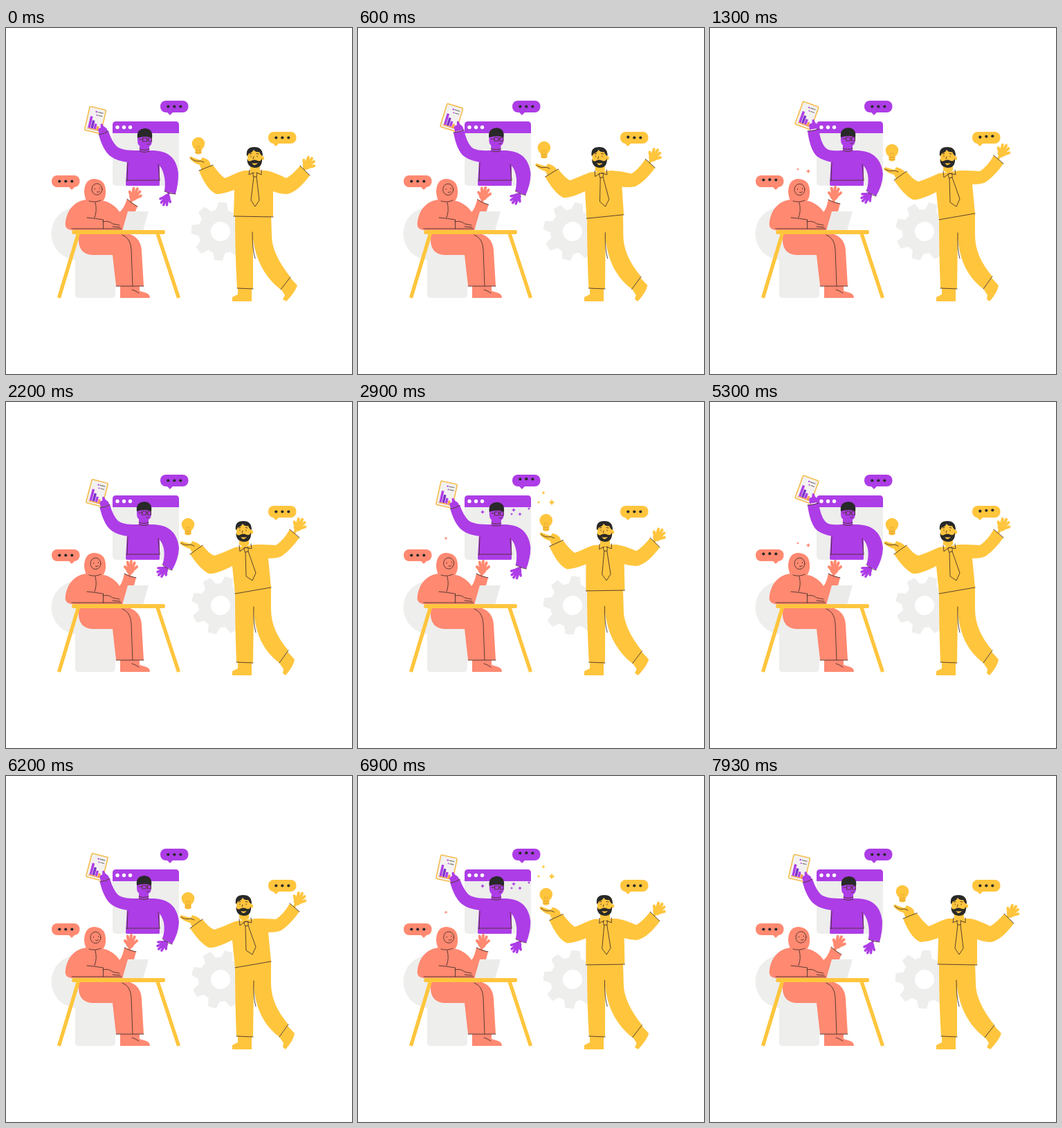
These frames come from a looping animation (500x500 px, 8.01 s). An HTML page:

```html
<!DOCTYPE html>
<html lang="en">
<head>
<meta charset="utf-8">
<title>Team meeting</title>
<style>
  html, body { margin: 0; width: 100%; height: 100%; overflow: hidden; background: #fff; }
  svg { display: block; width: 100vw; height: 100vh; }
  .coral { fill: #ff8971; }
  .gold { fill: #ffc53d; }
  .violet { fill: #ad3de6; }
  .pale { fill: #eeeeed; }
  .ink { fill: #292929; }
  .line { fill: none; stroke: #4a332b; stroke-width: .9; stroke-linecap: round; stroke-linejoin: round; }
</style>
</head>
<body>
<svg viewBox="0 0 500 500">
  <defs>
    <g id="palm" stroke-linecap="round">
      <ellipse rx="5.5" ry="6.5"/>
      <path d="M-2 0L-5 -10M0 0L0 -12M2 0L5 -10M3 2L9 -5M-2 3L-8 -3M0 2L0 9" stroke-width="4"/>
    </g>
    <path id="spark" d="M0 -1Q.15 -.15 1 0Q.15 .15 0 1Q-.15 .15 -1 0Q-.15 -.15 0 -1Z"/>
  </defs>

  <!-- backdrop -->
  <g id="gear" class="pale"></g>
  <circle class="pale" cx="104" cy="297" r="38.5"/>
  <path class="pale" d="M100 290H158V385Q158 390 153 390H105Q100 390 100 385Z"/>
  <rect class="pale" x="154" y="135" width="96" height="93" rx="5"/>
  <path class="violet" d="M154 152V140Q154 135 159 135H245Q250 135 250 140V152Z"/>
  <g fill="#fff"><circle cx="161" cy="143.5" r="2.7"/><circle cx="170.500" cy="143.5" r="2.7"/><circle cx="179.500" cy="143.5" r="2.7"/></g>

  <!-- presenter in the window -->
  <g data-pos="129 133 13" data-to="140 126.5 20" data-k="page">
    <rect x="-12" y="-17.5" width="24" height="35" rx="1.5" fill="#f3f1f0" stroke="#f5bd4d" stroke-width="1.6"/>
    <path class="violet" d="M-8 -4H-4.5V13H-8ZM.4 5H3.8V13H.4Z"/>
    <path fill="#7d32c9" d="M-3.8 1H-.3V13H-3.8Z"/>
    <path fill="#f7a24b" d="M4.4 8H7.6V13H4.4ZM-9 13H8.5V14.5H-9Z"/>
    <path d="M1 -12H9M3 -7.5H9" stroke="#777" stroke-width="1.2"/>
    <circle class="violet" cx="-1" cy="-12" r="1.2"/><circle class="violet" cx="1" cy="-7.5" r="1"/>
  </g>
  <g class="violet" data-pos="139.5 146.5 -14" data-to="149.5 140.5 -5" data-k="page">
    <path d="M-6 6L-6.5 0Q-6 -3 -2 -3L-1 -8Q2 -10 2.5 -4L6 0L7 5Z"/>
  </g>
  <g class="violet" stroke="#ad3de6" data-pos="232 246 204" data-to="228.5 243 228" data-k="drop"><use href="#palm" transform="scale(.88)"/></g>
  <path class="violet" data-k="page"
    data-a="M192 177C176 177 166 176 160 171Q153 164 148 149L134 154C137 166 143 180 152 186Q160 192 176 194Z"
    data-b="M192 177C177 178 170 177 166 172Q160 165 157 146L141 149C143 163 147 181 157 187Q163 191 176 194Z"/>
  <path class="violet" data-k="drop"
    data-a="M209 177C236 176 247 190 249 210Q249 226 245 240L229 236Q231 222 228 212Q226 202 219 196Z"
    data-b="M209 177C236 176 248 190 250 211Q249 228 240 243L226 235Q230 224 228 212Q226 202 219 196Z"/>
  <path class="violet" d="M188 177H215L222 196V227Q222 228 220 228H175Q173 228 173 226L175 190Z"/>
  <path class="line" d="M174 220H222M175 221L176 195M222 220L220 197"/>
  <path class="line" data-k="page" data-a="M134 154Q142 153 148 149" data-b="M141 149Q150 149 157 146"/>
  <path class="line" data-k="drop" data-a="M229 236Q237 240 245 240" data-b="M226 235Q232 241 240 243"/>
  <g data-pos="0 1 0" data-to="-1 0 0" data-k="lean">
    <path class="violet" d="M193 168H207V179H193Z"/>
    <path class="line" d="M193 174Q200 177 207 174M193 177Q200 180 207 177"/>
    <path class="violet" d="M190 153H211V163Q210 171 203 171H197Q190 170 190 162Z"/>
    <path class="ink" d="M190 158Q188 145 201 144Q213 145 211 158Q202 154 190 158Z"/>
    <path class="line" d="M193 160L198 160M198 158H203.5V163H198ZM206 158H210.500V163H206ZM203.5 160H206M204 167Q207 168 208 166"/>
  </g>

  <!-- woman at the desk -->
  <g class="coral" stroke="#ff8971" data-pos="184.5 243 27" data-to="179.5 242 7" data-k="wave"><use href="#palm"/></g>
  <path class="coral" data-k="wave"
    data-a="M140 252Q155 252 164 266Q170 262 175 247L190 258Q183 276 172 285L150 291Z"
    data-b="M140 252Q155 252 164 266Q168 262 171 248L188 254Q184 274 172 285L150 291Z"/>
  <path class="line" data-k="wave" data-a="M175 247Q182 254 190 258" data-b="M171 248Q179 253 188 254"/>
  <path class="coral" d="M116 248C100 250 89 261 86 280Q84 291 95 292H172V280Q160 254 142 250Z"/>
  <path class="coral" d="M113 236Q114 218 128 218Q143 219 144 234Q145 247 138 252L139 274H117L118 252Q113 245 113 236Z"/>
  <g class="line" data-pos="131.5 233 0" data-to="129.5 233.5 0" data-k="lean">
    <ellipse rx="7.5" ry="8.2"/>
    <path d="M-3 -1V0M4 -2V-1M0 4Q3 5 4 3"/>
  </g>
  <path class="line" d="M120 250Q129 253 137 249M129 252Q132 264 128 274M117 274Q128 275 140 277M95 290H167M140.500 290V277M140 280Q149 278 154 283L164 285M154 287L165 288"/>
  <path class="coral" d="M105 297H176Q195 302 196 322L199 373H159L154 328H124Q105 326 105 306Z"/>
  <path class="coral" d="M165 372H193V380L203 383Q208 385 208 390H165Z"/>
  <path class="line" d="M168 299Q180 303 181 320L183 373M159 373H199M182 378Q188 380 192 383"/>
  <path d="M176 265H206L198 293H168Z" fill="#ebebea"/>
  <g stroke="#ffc53d" stroke-linecap="round">
    <path d="M104.500 297L76.500 390M219 297L249.500 390" stroke-width="5.300" stroke-linecap="butt"/>
    <path d="M98 295H227" stroke-width="6"/>
  </g>

  <!-- man with the idea -->
  <g class="gold">
    <path data-k="lean"
      data-a="M331 268L383 268L384 300Q384 326 411 360L397 378C374 360 361 335 357 305L357 377L334 376Q331 330 331 268Z"
      data-b="M331 272L383 265L383 300Q383 330 408 359L395 377C372 360 361 335 358 305L357 377L333 376Q331 330 331 272Z"/>
    <path d="M335 375H355V395H327V389L335 385Z"/>
    <path data-k="lean"
      data-a="M397 377L410 360L421 372Q417 383 405 395L400 392L403 386Z"
      data-b="M395 377L407 361L417 372Q415 383 404 395L400 392L401 386Z"/>
    <path data-k="lean"
      data-a="M283 206L280 198Q270 195 265 188Q266 184 270 187L281 191L284 187Q291 189 294 193L297 202Z"
      data-b="M270 220L266 212Q257 210 251 204Q252 200 256 202L267 205L269 201Q277 203 281 207L284 211Z"/>
    <g stroke="#ffc53d" data-pos="435 198 36" data-to="422 180 31" data-k="lean"><use href="#palm"/></g>
    <path data-k="lean"
      data-a="M344 206C332 209 325 214 316 217Q308 211 299 198L279 206C285 222 294 236 304 240Q313 240 330 234L329 272L386 273L386 236Q396 240 406 240C417 238 428 228 439 213L425 199Q413 213 405 217C395 212 386 208 376 206Z"
      data-b="M331 210C321 214 311 219 301 222Q293 219 284 207L266 220C275 233 283 243 293 248Q304 249 327 237L331 277L383 268L379 226Q392 226 398 223C408 216 416 207 424 196L410 184Q402 199 390 207C381 206 371 206 361 206Z"/>
  </g>
  <g class="line">
    <path data-k="lean"
      data-a="M279 206L299 198M425 199L439 213M329 272L386 273"
      data-b="M266 220L284 207M410 184L424 196M331 277L383 268"/>
    <path data-k="lean"
      data-a="M267 188Q273 194 281 192L286 194M356 295Q356 320 360 333M334 376L357 377M397 378L411 360"
      data-b="M253 204Q259 208 267 206L272 208M358 296Q357 320 361 333M333 376L357 377M395 377L408 359"/>
    <path data-k="lean"
      data-a="M352 205L351 212L360 208L369 212L369 205M357 209L363 209L362 215L358 215ZM358 215L354 249L360 258L366 249L362 215"
      data-b="M337 207L338 216L346 210L355 212L354 205M344 211L350 210L350 216L346 217ZM346 217L347 252L356 258L361 247L350 216"/>
  </g>
  <g data-pos="0 0 0" data-to="-16 0 0" data-k="lean">
    <path class="gold" d="M353 194H367V206L360 210L353 206ZM349 177H370V192Q369 200 360 200Q350 200 349 192Z"/>
    <circle class="gold" cx="370.5" cy="188" r="2.7"/>
    <path class="ink" d="M348 185Q346 172 359 172Q371 172 371 185Q368 184 366 179Q361 180 358 176Q355 181 351 181Q350 184 348 185Z"/>
    <path class="ink" d="M348.500 189Q350 194 354 192Q359 189 364 192Q369 193 370 188Q371 202 359.500 202Q348 201 348.500 189Z"/>
    <path d="M355 195Q359 196 364 195Q361 199 358 198Z" fill="#ffc53d"/>
    <path class="line" d="M354 185V186M363 185V186M358 186L357 189M352 182L355 181.500M362 181.500L365 182"/>
  </g>
  <g data-pos="278 167 0" data-to="263 177 0" data-k="bulb">
    <path class="gold" d="M-9.300 0A9.300 9.300 0 1 1 9.300 0Q9 5 4.500 9V14Q0 17 -4.500 14V9Q-9 5 -9.300 0Z"/>
    <path d="M-4.500 10H4.500M-4.500 13H4.500" stroke="#d79a24" stroke-width=".9"/>
    <path class="line" d="M-2 9L-2 3L0 5L2 3L2 9" style="stroke:#e2a62c;stroke-width:.7"/>
  </g>

  <g id="bubbles"></g>
  <g id="sparks"></g>
</svg>
<script>
const LOOP = 8010, STEPS = 80;
const NS = 'http://www.w3.org/2000/svg';
const $ = id => document.getElementById(id);
const add = (parent, tag, attrs) => {
  const el = document.createElementNS(NS, tag);
  for (const name in attrs) el.setAttribute(name, attrs[name]);
  return parent.appendChild(el);
};

// [seconds, value] keys, eased in and out between neighbours
const tracks = {
  lean: [[0, 0], [1, 1], [2.3, 1], [3.2, -.1], [4, 0]],
  bulb: [[0, 0], [1.05, 1], [2.4, 1], [3.35, -.08], [4, 0]],
  page: [[0, 0], [1.1, 1], [1.5, 1], [2.6, -.1], [4, 0]],
  drop: [[0, 0], [1.1, 1], [2.2, 1], [3.4, 0], [4, 0]],
  wave: [[0, 0], [1, 1], [2.95, 1], [3.8, 0], [4, 0]]
};
function sample(keys, s) {
  const i = Math.max(1, keys.findIndex(k => k[0] >= s));
  const [t0, v0] = keys[i - 1], [t1, v1] = keys[i];
  const u = (s - t0) / (t1 - t0);
  return v0 + (v1 - v0) * u * u * (3 - 2 * u);
}

const numbers = text => text.match(/-?[\d.]+/g).map(Number);
const blend = (a, b, p) => a.map((v, i) => v + (b[i] - v) * p);

const morphs = [...document.querySelectorAll('[data-a]')].map(el => ({
  el, key: el.dataset.k, shape: el.dataset.a,
  a: numbers(el.dataset.a), b: numbers(el.dataset.b)
}));
const movers = [...document.querySelectorAll('[data-pos]')].map(el => ({
  el, key: el.dataset.k, a: numbers(el.dataset.pos), b: numbers(el.dataset.to)
}));

// gear: ring plus eight teeth
add($('gear'), 'circle', { r: 23, fill: 'none', stroke: '#eeeeed', 'stroke-width': 18 });
for (let i = 0; i < 8; i++)
  add($('gear'), 'path', { d: 'M-9 -29L-6 -42H6L9 -29Z', transform: `rotate(${i * 45})` });

// x, y, tail x, colour class, start of the dot wave
const dots = [];
[[66, 213, 29, 'coral', .7], [223, 105, 14, 'violet', 2.3], [379, 150, 11, 'gold', .5]].forEach(([x, y, tail, color, start]) => {
  const g = add($('bubbles'), 'g', { transform: `translate(${x} ${y})` });
  add(g, 'rect', { width: 40.5, height: 17, rx: 8, class: color });
  add(g, 'path', { d: `M${tail - 5} 16L${tail} 21L${tail + 5} 16Z`, class: color });
  for (let i = 0; i < 3; i++)
    dots.push({ el: add(g, 'circle', { cx: 11.3 + i * 9, r: 2.1, class: 'ink' }), start: start + i * .15 });
});

// x, y, radius, colour class, first and last second
const sparks = [
  [127, 204, 2, 'coral', .9, 1.8], [142, 207, 3.2, 'coral', .8, 1.9], [127, 197, 2.4, 'coral', 2.2, 3.4],
  [280, 145, 5, 'gold', 2.3, 3.5], [268, 131, 2.8, 'gold', 2.4, 3.4], [261, 145, 2.3, 'gold', 2.3, 3.4],
  [180, 159, 3, 'violet', 2.3, 3.5], [225, 156, 3, 'violet', 2.4, 3.5],
  [234, 162, 2.8, 'violet', 2.3, 3.4], [222, 162, 2, 'violet', 2.4, 3.3], [247, 154, 2.3, 'violet', 2.3, 3.4]
].map(([x, y, r, color, from, to]) => ({
  x, y, r, from, to, el: add($('sparks'), 'use', { href: '#spark', class: color })
}));
const pulse = (s, from, length) => {
  const u = (s - from) / length;
  return u > 0 && u < 1 ? Math.sin(Math.PI * u) : 0;
};

function draw(s) {
  const p = {};
  for (const key in tracks) p[key] = sample(tracks[key], s);
  for (const { el, key, shape, a, b } of morphs) {
    const mixed = blend(a, b, p[key]);
    let i = 0;
    el.setAttribute('d', shape.replace(/-?[\d.]+/g, () => mixed[i++].toFixed(2)));
  }
  for (const { el, key, a, b } of movers) {
    const [x, y, turn] = blend(a, b, p[key]);
    el.setAttribute('transform', `translate(${x} ${y}) rotate(${turn})`);
  }
  $('gear').setAttribute('transform', `translate(310 294) rotate(${4 + 13 * p.lean})`);
  for (const { el, start } of dots) el.setAttribute('cy', 8.5 - 2.3 * pulse(s, start, .9));
  for (const { el, x, y, r, from, to } of sparks) {
    const size = r * Math.min(1, 1.3 * pulse(s, from, to - from));
    el.setAttribute('transform', `translate(${x} ${y}) scale(${size})`);
  }
}

// the picture steps twice every 100 ms, at 0 and 30
function tick() {
  const t = performance.now() % LOOP;
  const step = t >= 7930 ? 159 : 2 * Math.floor(t / 100) + (t % 100 >= 30 ? 1 : 0);
  draw((step % STEPS) * .05);
  requestAnimationFrame(tick);
}
tick();
</script>
</body>
</html>
```
